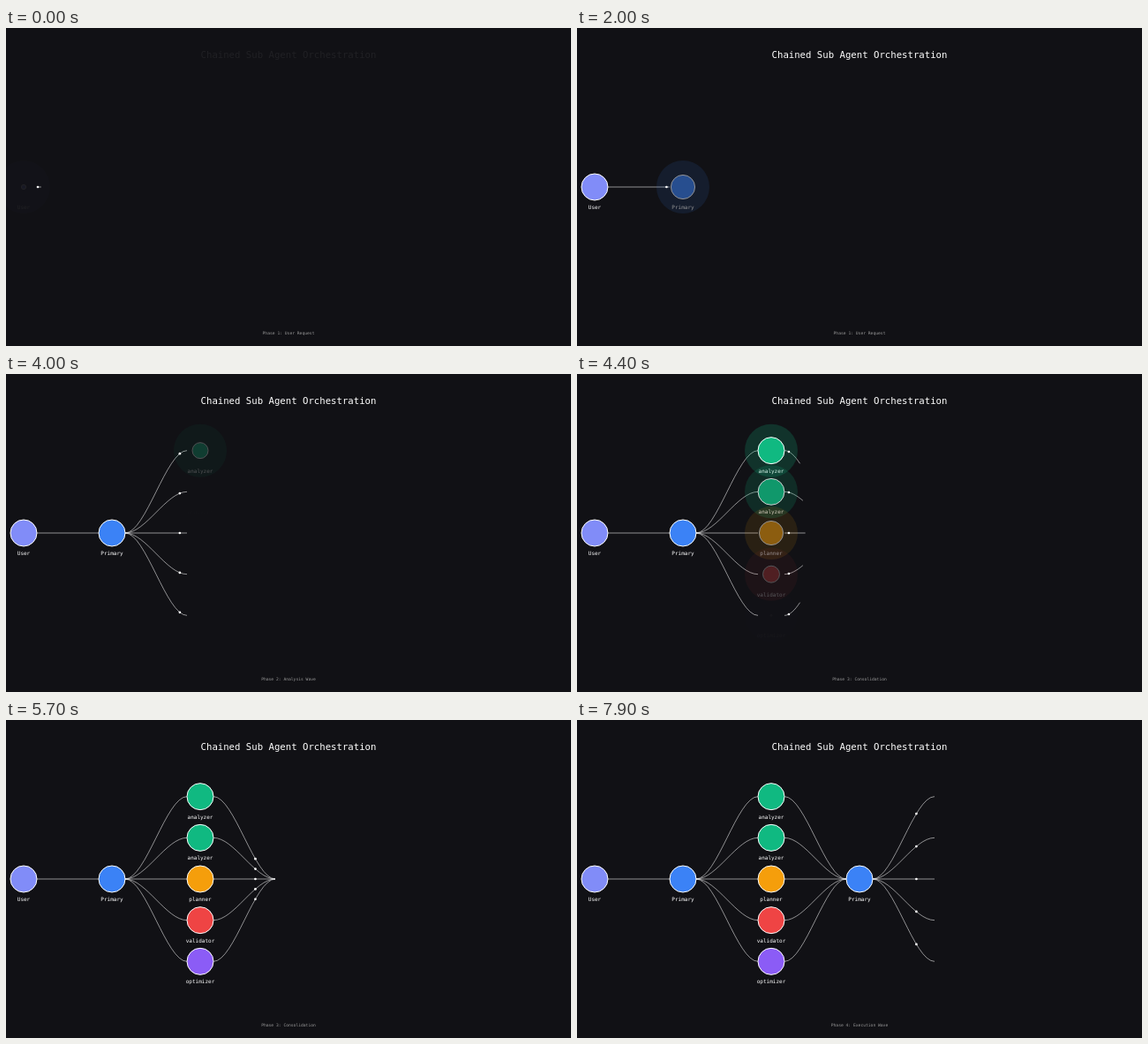
Write an HTML page that moves like this. It is 640 px wide and 360 px high and loops after 8 s.

```html
<!DOCTYPE html>
<html lang="en">
<head>
<meta charset="utf-8">
<title>Chained Sub Agent Orchestration</title>
<style>
  html, body { margin: 0; width: 100%; height: 100%; overflow: hidden; background: #111115; }
  svg { display: block; width: 100vw; height: 100vh; }
  text { font-family: "DejaVu Sans Mono", "Liberation Mono", monospace; text-anchor: middle; fill: #fff; }
</style>
</head>
<body>
<svg id="stage" viewBox="0 0 1920 1080"></svg>
<script>
const LOOP = 8000;
const LEAD = 30;          // the first phase is already under way when the loop starts
const PHASE = 2140;
const ARRIVE = 1760;      // delay within a phase before its target nodes appear
const STAGGER = 130;
const FADE = 500;
const ACTIVE = 1250;
const DRAW_SPEED = 0.47;  // line length per ms
const RADIUS = 45;
const MID = 540;

const stage = document.getElementById('stage');
const clamp = v => Math.max(0, Math.min(1, v));
const smooth = p => p * p * (3 - 2 * p);
const easeOut = p => 1 - (1 - p) ** 3;

function add(parent, tag, attrs, text) {
  const el = document.createElementNS('http://www.w3.org/2000/svg', tag);
  set(el, attrs);
  if (text) el.textContent = text;
  parent.appendChild(el);
  return el;
}

function set(el, attrs) {
  for (const key in attrs) el.setAttribute(key, attrs[key]);
}

const phaseStart = i => i * PHASE - LEAD;
const rows = [0, 1, 2, 3, 4].map(i => 260 + i * 140);
const captions = ['User Request', 'Analysis Wave', 'Consolidation', 'Execution Wave'];

const lineLayer = add(stage, 'g', { fill: 'none', stroke: '#fff', 'stroke-width': 2, 'stroke-opacity': 0.8 });
const nodeLayer = add(stage, 'g', {});
const dotLayer = add(stage, 'g', { fill: '#fff' });
const title = add(stage, 'text', { x: 960, y: 101, 'font-size': 32 }, 'Chained Sub Agent Orchestration');
const caption = add(stage, 'text', { x: 960, y: 1040, 'font-size': 14, style: 'fill:#999' });

function makeLink(phase, x, y1, y2) {
  const x1 = x + RADIUS, width = 210;
  const d = `M${x1} ${y1}C${x1 + width / 3} ${y1} ${x1 + width * 2 / 3} ${y2} ${x1 + width} ${y2}`;
  return {
    phase, x1, width, y1, y2,
    line: add(lineLayer, 'path', { d }),
    dot: add(dotLayer, 'circle', { r: 4 })
  };
}

function makeNode(x, y, color, label, start) {
  const group = add(nodeLayer, 'g', {});
  const halo = add(group, 'circle', { cx: x, cy: y, r: 2 * RADIUS, fill: color, 'fill-opacity': 0.2 });
  const disc = add(group, 'circle', { cx: x, cy: y, fill: color, stroke: '#fff', 'stroke-width': 3 });
  add(group, 'text', { x, y: y + 75, 'font-size': 18 }, label);
  return { group, halo, disc, start };
}

const links = [
  makeLink(0, 60, MID, MID),
  ...rows.map(y => makeLink(1, 360, MID, y)),
  ...rows.map(y => makeLink(2, 660, y, MID)),
  ...rows.map(y => makeLink(3, 960, MID, y))
];

const agents = [
  ['analyzer', '#10b981'], ['analyzer', '#10b981'], ['planner', '#f59e0b'],
  ['validator', '#ef4444'], ['optimizer', '#8b5cf6']
];

const nodes = [
  makeNode(60, MID, '#818cf8', 'User', -LEAD),
  makeNode(360, MID, '#3b82f6', 'Primary', phaseStart(0) + ARRIVE),
  ...agents.map(([label, color], i) =>
    makeNode(660, rows[i], color, label, phaseStart(1) + ARRIVE + i * STAGGER)),
  makeNode(960, MID, '#3b82f6', 'Primary', phaseStart(2) + ARRIVE)
];

function show(el, visible) {
  el.setAttribute('visibility', visible ? 'visible' : 'hidden');
}

function render(t) {
  title.setAttribute('opacity', clamp((t + 60) / 1060));
  const phase = Math.floor((t + LEAD) / PHASE);
  caption.textContent = `Phase ${phase + 1}: ${captions[phase]}`;

  for (const link of links) {
    const age = t - phaseStart(link.phase);
    const p = age / PHASE;
    show(link.line, age > 0);
    show(link.dot, p >= 0 && p < 1);
    set(link.line, { 'stroke-dasharray': `${Math.max(0, age * DRAW_SPEED)} 9999` });
    set(link.dot, {
      cx: link.x1 + link.width * p,
      cy: link.y1 + (link.y2 - link.y1) * smooth(clamp(p))
    });
  }

  for (const node of nodes) {
    const age = t - node.start;
    const p = clamp(age / FADE);
    node.group.setAttribute('opacity', p);
    node.disc.setAttribute('r', RADIUS * easeOut(p));
    show(node.halo, age < ACTIVE);
  }
}

const began = performance.now();
function tick() {
  render((performance.now() - began) % LOOP);
  requestAnimationFrame(tick);
}
tick();
</script>
</body>
</html>
```
